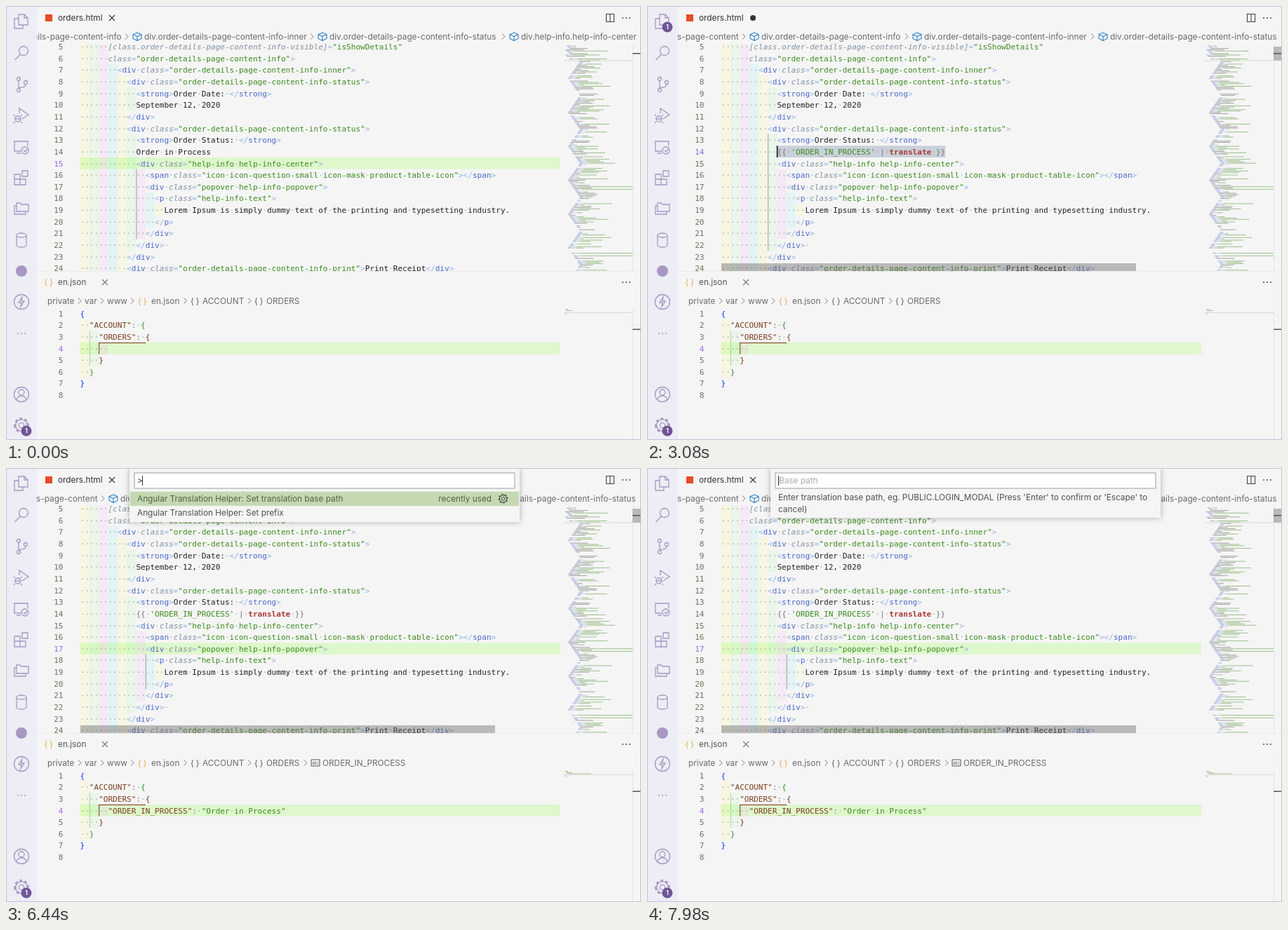
These frames come from a looping animation (905 by 619 pixels, 8000 ms). An HTML page with a canvas:

```html
<!DOCTYPE html>
<html lang="en">
<head>
<meta charset="utf-8">
<title>Editor</title>
<style>
html, body { margin: 0; width: 100%; height: 100%; overflow: hidden; background: #f5f5f5; }
canvas { display: block; width: 905px; height: 619px; }
</style>
</head>
<body>
<canvas id="stage"></canvas>
<script>
const W = 905, H = 619, LOOP = 8000, STEP = 70;
const MONO = '"DejaVu Sans Mono", monospace', UI = 'Inter, sans-serif';
const X0 = 105.5, CW = 6.66, LH = 16.63;      // code origin, character width, line height
const PURPLE = '#705697', ICON = '#a897c2', ACTIVE = '#333', FADED = '#777';
const canvas = document.getElementById('stage'), c = canvas.getContext('2d');
const dpr = window.devicePixelRatio || 1;
canvas.width = W * dpr;
canvas.height = H * dpr;

const HTML_LINES = [
  '      [class.order-details-page-content-info-visible]="isShowDetails"',
  '      class="order-details-page-content-info">',
  '        <div class="order-details-page-content-info-inner">',
  '          <div class="order-details-page-content-info-status">',
  '            <strong>Order Date: </strong>',
  '            September 12, 2020',
  '          </div>',
  '          <div class="order-details-page-content-info-status">',
  '            <strong>Order Status: </strong>',
  '            Order in Process',
  '            <div class="help-info help-info-center">',
  '              <span class="icon icon-question-small icon-mask product-table-icon"></span>',
  '              <div class="popover help-info-popover">',
  '                <p class="help-info-text">',
  '                  Lorem Ipsum is simply dummy text of the printing and typesetting industry.',
  '                </p>',
  '              </div>',
  '            </div> ',
  '          </div>',
  '          <div class="order-details-page-content-info-print">Print Receipt</div>'
];
const TRANSLATED = "            {{ 'ORDER_IN_PROCESS' | translate }}";
const JSON_LINES = ['{', '  "ACCOUNT": {', '    "ORDERS": {', '      ', '    }', '  }', '}', ''];
const PASTED = '      "ORDER_IN_PROCESS": "Order in Process"';

const HTML_RULES = [
  [/<\/?|>|=/y, '#91b3e0'],
  [/(?<=<\/?)\w+/y, '#4b69c6'],
  [/\[?[\w.-]+\]?(?==)/y, '#8190a0', 'italic '],
  [/"[^"]*"|'[^']*'/y, '#3c8a20'],
  [/translate/y, '#aa3731', 'bold '],
  [/[{}|]+/y, '#777'],
  [/\w+|./y, '#222']
];
const JSON_RULES = [
  [/"\w+"(?=:)/y, '#7a3e1d'],
  [/"[^"]*"/y, '#3c8a20'],
  [/[{}]/y, depth => ['#0431fa', '#319331', '#7b3814'][depth]],
  [/\w+|./y, '#777']
];
const COMMANDS = [
  'Angular Translation Helper: Set translation base path', 'Angular Translation Helper: Set prefix',
  'Indent Using Spaces', 'Convert Indentation to Spaces', 'Project Manager: Save Project',
  'Settings Profile: Import Settings from a Profile...', 'Preferences: Color Theme',
  'Toggle Column Selection Mode', 'Go: Build Workspace',
  'Settings Profile: Export Settings as a Profile...', 'Go: Build Current Package',
  'Go: Install/Update Tools'
];
const KEYS = { 6: ['⌃', '`'], 7: ['⇧', '⌘', '8'] };

const ring = (x, y, r) => `M${x - r} ${y}a${r} ${r} 0 1 0 ${2 * r} 0a${r} ${r} 0 1 0 ${-2 * r} 0`;
const ACTIVITY = [
  [22, 'M-4 -10h8l5 5v10h-13zM4 -10v5h5M-4 -4h-6v14h12v-5'],
  [67, ring(3, -3, 6.5) + 'M-1.5 2l-8 8'],
  [112, ring(-4, -8, 2.5) + ring(6, -3, 2.5) + ring(-4, 8, 2.5) + 'M-4 -5.5v11M6 -.5c0 5 -5 4 -10 5'],
  [156, 'M-3 -3v-7l13 9l-9 6' + ring(-5, 5, 4) + 'M-9 5h8M-9 1l-2 -2M-1 1l2 -2M-9 9l-2 2M-1 9l2 2'],
  [201, 'M-1 6h-9v-14h19v7M-7 9h6' + ring(5, 5, 5) + 'M3 5l2 2l3 -4'],
  [245, 'M-10 -5h8v15h-8zM-10 2h16v8h-8M1 -10h8v8h-8z'],
  [289, 'M-7 -8h5l2 2h10v10h-17zM-7 -4h-3v12h16v-4'],
  [334, 'M-7 -7a7 3 0 0 0 14 0a7 3 0 0 0 -14 0v14a7 3 0 0 0 14 0v-14'],
  [422, ring(0, 0, 10.5) + 'M1 -7l-5 8h4l-1 6l5 -8h-4z'],
  [554, ring(0, 0, 10.5) + ring(0, -3, 4) + 'M-7 8a7 6 0 0 1 14 0']
].map(([y, d]) => [y, new Path2D(d)]);
const CUBE = new Path2D('M0 -5.5l6 2.5v6l-6 3l-6 -3v-6zM-6 -3l6 3l6 -3M0 0v6');
const CROSS = new Path2D('M-4 -4l8 8M4 -4l-8 8');
const CHEVRON = new Path2D('M-2 -4l4 4l-4 4');
const SPLIT = new Path2D('M-5.5 -5.5h11v11h-11zM0 -5.5v11');
const LABEL = new Path2D('M-6 -4.5h12v9h-12z');

const clamp = v => Math.max(0, Math.min(1, v));
const ramp = (t, from, to) => clamp((t - from) / (to - from));
const hash = n => { const v = Math.sin(n * 127.1) * 43758.5453; return v - Math.floor(v); };
const blink = (t, start) => Math.trunc((t - start) / 490) % 2 == 0;
const topY = n => 58 + (n - 5) * LH;
const jsonY = n => 438.5 + (n - 1) * LH;
const colX = n => X0 + n * CW;

function rect(x, y, w, h, color) {
  c.fillStyle = color;
  c.fillRect(x, y, w, h);
}
function text(s, x, y, color = '#666', font = `11.8px ${UI}`, align = 'left') {
  c.font = font;
  c.fillStyle = color;
  c.textAlign = align;
  c.fillText(s, x, y + 4.2);
}
function icon(path, x, y, color, width = 1) {
  c.save();
  c.translate(x, y);
  c.strokeStyle = color;
  c.lineWidth = width;
  c.stroke(path);
  c.restore();
}
function disc(x, y, r, color) {
  c.fillStyle = color;
  c.beginPath();
  c.arc(x, y, r, 0, 7);
  c.fill();
}
function dots(x, y, color) {
  for (let i = -1; i < 2; i++) disc(x + i * 5, y, 1, color);
}
function gear(x, y, r, color, width) {
  c.save();
  icon(new Path2D(ring(0, 0, r * .35) + ring(0, 0, r * .78)), x, y, color, width);
  c.setLineDash([r * .36, r * .34]);
  icon(new Path2D(ring(0, 0, r * .92)), x, y, color, r * .25);
  c.restore();
}
function badge(x, y) {
  disc(x, y, 7.5, PURPLE);
  text('1', x, y - .8, '#fff', `bold 8.5px ${UI}`, 'center');
}
function clipped(x, y, w, h, draw) {
  c.save();
  c.beginPath();
  c.rect(x, y, w, h);
  c.clip();
  draw();
  c.restore();
}

function codeLine(s, y, rules) {
  const indent = s.match(/^ */)[0].length;
  const tints = ['255,255,64', '127,255,127', '255,127,255', '79,236,236'];
  for (let i = 0; i < indent; i += 2)
    rect(colX(i), y - LH / 2, CW * 2, LH, `rgba(${tints[i / 2 % 4]},.1)`);
  text([...s].map(ch => ch == ' ' ? '·' : ' ').join(''), X0, y, '#aaa', `11.07px ${MONO}`);
  for (let i = 0; i < s.length;) {
    for (const [pattern, color, style = ''] of rules) {
      pattern.lastIndex = i;
      const match = pattern.exec(s);
      if (!match) continue;
      text(match[0], colX(i), y, typeof color == 'function' ? color(indent / 2) : color,
        `${style}11.07px ${MONO}`);
      i += match[0].length;
      break;
    }
  }
}
function lineNumber(n, y, active) {
  text(n, 81.5, y, active ? '#9769dc' : '#6d705b', `11.07px ${MONO}`, 'right');
}
const caret = (col, y) => rect(colX(col) - .7, y - LH / 2, 1.8, LH, '#222');

function crumbs(s) {
  const base = 'div.order-details-page-content';
  const [items, xs, end] = s.oldCrumbs
    ? [[base + '-info-inner', base + '-info-status', 'div.help-info.help-info-center'], [197, 461, 734], 164.5]
    : [[base + '-info', base + '-info-inner', base + '-info-status'], [163, 395, 660], 130.5];
  clipped(44, 34, 861, 20, () => {
    text(base + (s.oldCrumbs ? '-info' : ''), end, 43.5, '#6b6b6b', undefined, 'right');
    items.forEach((item, i) => {
      icon(CHEVRON, xs[i] - 25, 43.5, '#777');
      icon(CUBE, xs[i] - 10, 43.5, '#2a7fc4', 1.1);
      text(item, xs[i], 43.5, '#6b6b6b');
    });
  });
}
function minimap() {
  for (let i = 0; i < 174; i++) {
    const y = 54.5 + i * 1.86, wave = Math.abs(i % 26 - 13);
    if (hash(i) < .14) continue;
    const x = 797 + (i < 12 ? i % 4 * 2 : 4 + (13 - wave) * 1.3);
    const long = i % 52 > 3 && i % 52 < 8 && i > 100;
    const len = Math.min(893 - x, long ? 90 : 8 + hash(i + 500) * (i < 12 ? 60 : 48));
    const kind = hash(i + 900);
    if (kind < .3) rect(x, y, Math.min(len, 26), 1, 'rgba(60,60,60,.45)');
    else {
      rect(x, y, 5, 1, 'rgba(75,105,198,.5)');
      if (kind > .45) rect(x + 6, y, 5, 1, 'rgba(129,144,160,.4)');
      if (kind > .45) rect(x + 11, y, Math.max(0, len - 11), 1, 'rgba(68,140,39,.5)');
    }
  }
  rect(795, 77.5, 98, 1, '#d5dccf');
}

function activityBar(s) {
  rect(0, 0, 44, H, '#ededf5');
  ACTIVITY.forEach(([y, path]) => icon(path, 22, y, ICON, 1.3));
  disc(22, 378, 8, ICON);
  dots(22, 467, ICON);
  gear(22, 598, 10.5, ICON, 1.3);
  badge(29, 606);
  if (s.dirtyTop || s.dirtyJson) badge(29, 30);
}
function tab(x, y, closeX, name, focused, dirty) {
  const color = focused ? ACTIVE : FADED;
  text(name, x, y, focused ? ACTIVE : '#555');
  if (dirty) disc(closeX, y, 4, ACTIVE);
  else icon(CROSS, closeX, y, color, 1.1);
  if (focused) icon(SPLIT, 861, y, '#444', 1.1);
  dots(884, y, '#444');
}
function slider(x, y, w, h, alpha) {
  if (alpha > 0) rect(x, y, w, h, `rgba(100,100,100,${.42 * alpha})`);
}

function htmlEditor(s) {
  rect(56, 12, 10, 10, '#e44d26');
  tab(74, 17, 151, 'orders.html', !s.jsonFocus, s.dirtyTop);
  crumbs(s);
  clipped(44, 54, 861, 324.5, () => {
    if (!s.selected) rect(X0, topY(s.line) - LH / 2, 790 - X0, LH, '#def7cc');
    HTML_LINES.forEach((line, i) => {
      const n = i + 5, y = topY(n);
      if (n == 14 && s.replaced) line = TRANSLATED;
      if (n == 14 && s.selected)
        rect(colX(12), y - LH / 2, (line.length - 12) * CW, LH, s.jsonFocus ? '#dfe3e6' : '#c9d0d9');
      lineNumber(n, y, n == s.line);
      codeLine(line, y, HTML_RULES);
    });
    const [col, from, to] = { 14: [10, 13, 22], 15: [12, 16, 21], 17: [14, 18, 20] }[s.line];
    rect(colX(col), topY(from) - LH / 2, 1, (to - from + 1) * LH, '#9a9f9a');
    if (s.htmlCaret) caret(s.line == 17 ? 29 : s.selected ? 12 : 28, topY(s.line));
    minimap();
    slider(106, 367, 591, 12, s.topBars);
  });
  rect(893, 54, 1, 324, '#e4e4e4');
  slider(893, 58, 12, 20, s.topBars);
  rect(893, 67, 12, 1.5, '#555');
}
function jsonEditor(s) {
  rect(44, 378, 861, 1, '#ececec');
  const braces = (x, y, color) => text('{ }', x, y, color, `11px ${UI}`);
  braces(54.5, 394, '#e5a93c');
  tab(74, 394, 141, 'en.json', s.jsonFocus, s.dirtyJson);
  [['private', 59], ['var', 112], ['www', 144], ['en.json', 207], ['ACCOUNT', 280], ['ORDERS', 371]]
    .forEach(([name, x]) => text(name, x, 420.5, '#6b6b6b'));
  [105, 137, 180, 255.5, 347].forEach(x => icon(CHEVRON, x, 420.5, '#777'));
  braces(188, 420.5, '#e5a93c');
  braces(263, 420.5, '#555');
  braces(354, 420.5, '#555');
  if (s.jsonCrumb) {
    icon(CHEVRON, 427, 420.5, '#777');
    icon(LABEL, 441, 420.5, '#555');
    text('abc', 441, 419.2, '#555', `5.5px ${UI}`, 'center');
    text('ORDER_IN_PROCESS', 451, 420.5, '#6b6b6b');
  }
  rect(X0, jsonY(4) - LH / 2, 790 - X0, LH, '#def7cc');
  JSON_LINES.forEach((line, i) => {
    const y = jsonY(i + 1);
    lineNumber(i + 1, y, i == 3);
    codeLine(i == 3 && s.pasted ? PASTED : line, y, JSON_RULES);
  });
  rect(colX(2), jsonY(3) - LH / 2, 1, LH * 3, 'rgba(49,147,49,.35)');
  rect(colX(4), 480, 67, 1, '#7b3814');
  rect(colX(4), 480, 1, LH, '#7b3814');
  if (s.jsonFocus) {
    c.strokeStyle = '#b0b0b0';
    c.lineWidth = 1;
    c.strokeRect(colX(14), jsonY(3) - 7.5, CW, 15);
    c.strokeRect(colX(4), jsonY(5) - 7.5, CW, 15);
    if (s.jsonCaret) caret(s.pasted ? 44 : 6, jsonY(4));
  }
  rect(797, 432, 4, 1, '#c9a98f');
  rect(798, 434, 9, 1, '#c9a98f');
  if (s.pasted) rect(800, 435.5, 34, 1, '#b7c79f');
  rect(795, 437, 98, 1, '#d8d8d8');
  rect(797, 439, 2, 1, '#aaa');
  rect(893, 431, 1, 188, '#e4e4e4');
  slider(893, 431, 12, 117, s.jsonBar);
  rect(893, 460.5, 12, 1.5, '#555');
}

function panel(height) {
  c.save();
  c.shadowColor = 'rgba(0,0,0,.3)';
  c.shadowBlur = 8;
  rect(176, 0, 556, height, '#f5f5f5');
  c.restore();
  rect(182.5, 6.5, 543, 23, '#9e9e9e');
  rect(183.5, 7.5, 541, 21, '#fff');
}
function keycap(label, x, y) {
  c.fillStyle = '#e9e9e9';
  c.strokeStyle = '#c4c4c4';
  c.lineWidth = 1;
  c.beginPath();
  c.roundRect(x - 9.5, y - 8, 19, 15.5, 3);
  c.fill();
  c.stroke();
  text(label, x, y - .5, '#555', '10px Inter, "DejaVu Sans", sans-serif', 'center');
}
function palette(t) {
  const count = t < 6720 ? 2 : 12, rowH = 20.3;
  const k = ramp(t, 6720, 7490), hover = 11 - Math.round(11 * k * k * (3 - 2 * k));
  panel(33.6 + count * rowH + 3);
  text('>', 187, 18, '#333');
  if (blink(t, 6790)) rect(194, 11, 1, 14, '#222');
  COMMANDS.slice(0, count).forEach((name, i) => {
    const y = 43.8 + i * rowH, hovered = count > 2 && i == hover;
    if (!i || hovered) rect(177, y - rowH / 2, 554, rowH, i ? '#e2e2e2' : '#c4d9b1');
    text(name, 187, y, i ? '#505050' : '#53614b');
    if (!i) {
      text('recently used', 692, y, '#53614b', undefined, 'right');
      if (count > 2) rect(722, y - rowH / 2, 9, rowH, 'rgba(100,140,80,.3)');
    }
    if (!i || hovered) gear(708.5, y, 6.5, '#444', 1);
    (KEYS[i] || []).forEach((key, j, keys) =>
      keycap(key, 706 - (keys.length - 1 - j) * 23.5 - (hovered ? 23 : 0), y));
  });
}
function basePathInput() {
  panel(71);
  text('Base path', 188, 18, '#aaa');
  rect(187, 11, 1, 14, '#222');
  text("Enter translation base path, eg. PUBLIC.LOGIN_MODAL (Press 'Enter' to confirm or 'Escape' to", 187, 42, '#505050');
  text('cancel)', 187, 58.6, '#505050');
}

function stateAt(t) {
  const between = (a, b) => t >= a && t < b;
  const jsonFocus = between(4270, 5530);
  const selected = between(2100, 5530);
  return {
    jsonFocus, selected,
    line: t < 1050 ? 15 : t < 5530 ? 14 : 17,
    replaced: t >= 3080,
    pasted: t >= 4900,
    oldCrumbs: t < 1190,
    jsonCrumb: t >= 4970,
    dirtyTop: between(3080, 4270),
    dirtyJson: between(4900, 5530),
    topBars: t < 5110 ? ramp(t, 1050, 1260) - ramp(t, 3640, 4480) : ramp(t, 5110, 5390),
    jsonBar: ramp(t, 3570, 3710) - ramp(t, 5530, 6020),
    htmlCaret: between(1050, 6440) && !jsonFocus && blink(t, t < 2100 ? 1120 : selected ? 2100 : 5530),
    jsonCaret: blink(t, t < 4900 ? 4270 : 4900)
  };
}
function draw(t) {
  const s = stateAt(t);
  c.setTransform(dpr, 0, 0, dpr, 0, 0);
  rect(0, 0, W, H, '#f5f5f5');
  htmlEditor(s);
  jsonEditor(s);
  activityBar(s);
  if (t >= 7980) basePathInput();
  else if (t >= 6440 && t < 7910) palette(t);
  c.strokeStyle = '#c8bcd9';
  c.lineWidth = 1;
  c.strokeRect(.5, .5, W - 1, H - 1);
}

const start = performance.now();
function tick() {
  const t = (performance.now() - start) % LOOP;
  draw(Math.floor(t / STEP) * STEP);
  requestAnimationFrame(tick);
}
tick();
</script>
</body>
</html>
```
